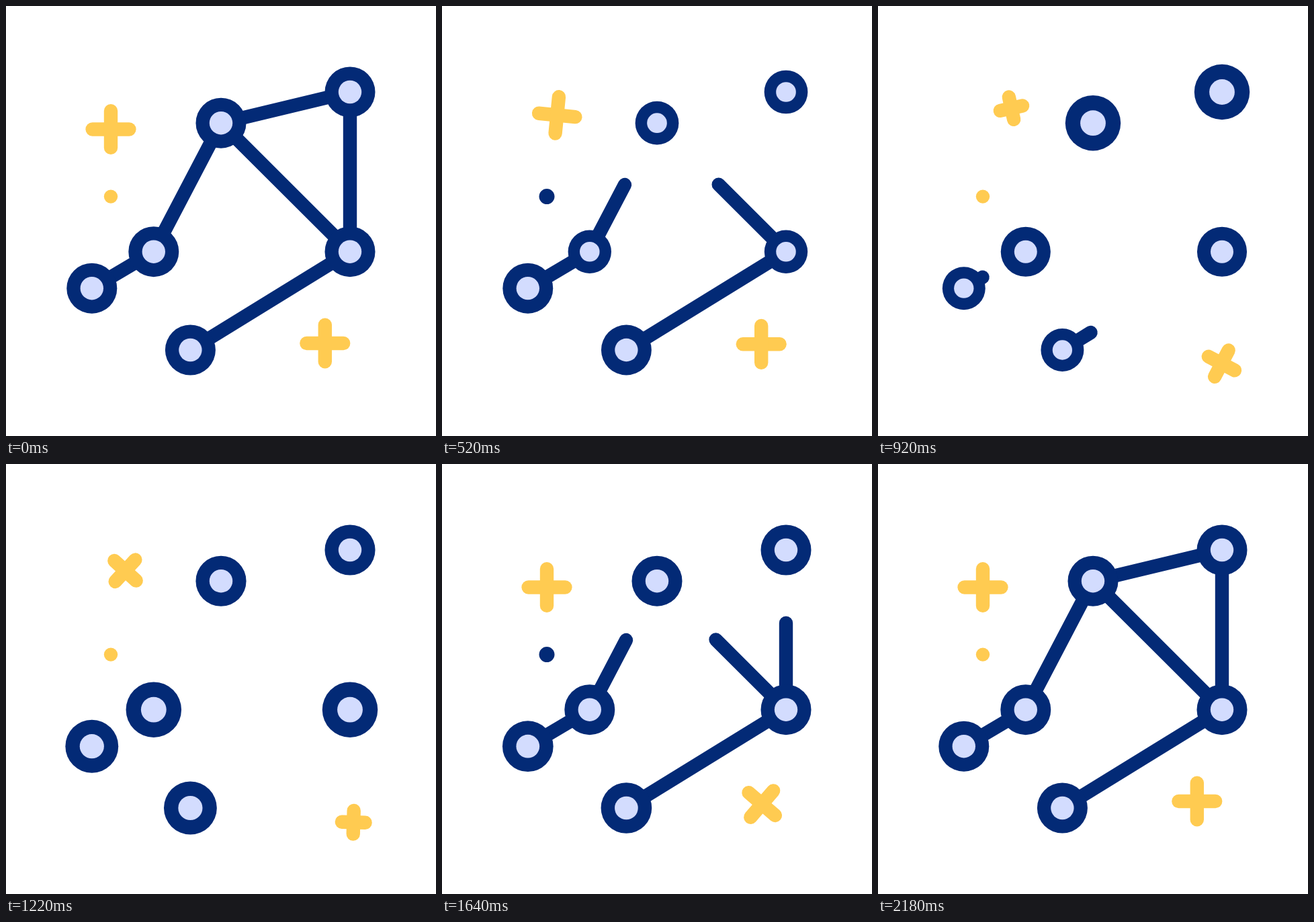
Recreate the animation shown at these times as an HTML page with a canvas. Size 640x640 px, loop 2400 ms.

```html
<!DOCTYPE html>
<html lang="en">
<head>
<meta charset="utf-8">
<title>Constellation</title>
<style>
  html, body { margin: 0; width: 100%; height: 100%; overflow: hidden; background: #fff; }
  canvas { display: block; width: 100vmin; height: 100vmin; }
</style>
</head>
<body>
<canvas id="stage"></canvas>
<script>
const LOOP = 2400, SIZE = 640;
const NAVY = '#032a76', PALE = '#d3dcfe', GOLD = '#ffcb51';
const canvas = document.getElementById('stage');
const ctx = canvas.getContext('2d');
const dpr = window.devicePixelRatio || 1;
canvas.width = canvas.height = SIZE * dpr;

// x, y, pulse delay
const nodes = {
  a: [512, 128, 0],
  b: [320, 174.2, 0],
  c: [219.8, 365.7, 230],
  f: [512, 365.7, 230],
  d: [127.8, 420.2, 460],
  e: [274.4, 512, 460]
};

// from, to, retract start, extend start
const links = [
  ['b', 'a', 0, 1770],
  ['f', 'a', 0, 1423],
  ['f', 'b', 315, 1423],
  ['c', 'b', 315, 1423],
  ['d', 'c', 624, 1173],
  ['e', 'f', 624, 1173]
];
const TRIM = 420;

const cubic = u => u < 0.5 ? 4 * u ** 3 : 1 - 4 * (1 - u) ** 3;
const sine = u => (1 - Math.cos(Math.PI * u)) / 2;
const span = (t, from, to, ease) =>
  ease(Math.min(1, Math.max(0, (t - from) / (to - from))));

function disc(x, y, r, color) {
  ctx.fillStyle = color;
  ctx.beginPath();
  ctx.arc(x, y, r, 0, Math.PI * 2);
  ctx.fill();
}

function line(x1, y1, x2, y2, color) {
  ctx.strokeStyle = color;
  ctx.beginPath();
  ctx.moveTo(x1, y1);
  ctx.lineTo(x2, y2);
  ctx.stroke();
}

function drawLink([from, to, retract, extend], t) {
  const part = 1 - span(t, retract, retract + TRIM, cubic)
    + span(t, extend, extend + TRIM, cubic);
  if (part < 0.001) return;
  const [x1, y1] = nodes[from], [x2, y2] = nodes[to];
  const len = Math.hypot(x2 - x1, y2 - y1);
  const ux = (x2 - x1) / len, uy = (y2 - y1) / len;
  const start = 27, tip = start + (len - 2 * start) * part;
  line(x1 + ux * start, y1 + uy * start, x1 + ux * tip, y1 + uy * tip, NAVY);
}

function drawNode([x, y, delay], t) {
  const p = t - delay;
  const scale = 1
    - 0.15 * span(p, 10, 380, cubic)
    + 0.25 * span(p, 380, 980, cubic)
    - 0.1 * span(p, 980, 1260, cubic);
  disc(x, y, 37.5 * scale, NAVY);
  disc(x, y, 17.2 * scale, PALE);
}

// Swings out along a curve while turning and shrinking, then comes back.
function drawPlus(x, y, dir, t) {
  const s = span(t, 140, 890, cubic) - span(t, 940, 1576, cubic);
  const bend = 2 * s * (1 - s);
  const turn = span(t, 458, 1015, sine) + span(t, 1060, 1558, sine);
  const arm = 27.4 - 10.4 * (span(t, 460, 900, cubic) - span(t, 900, 1560, sine));
  ctx.save();
  ctx.translate(x + 42.5 * (0.17 * bend + s * s), y + dir * 31.3 * (0.8 * bend + s * s));
  ctx.rotate(-dir * Math.PI * turn);
  line(-arm, 0, arm, 0, GOLD);
  line(0, -arm, 0, arm, GOLD);
  ctx.restore();
}

function drawDot(t) {
  const dark = t < 1760 && Math.floor(t / 440) % 2 === 1;
  disc(156, 283.6, dark ? 11.5 : 10.2, dark ? NAVY : GOLD);
}

function draw(t) {
  ctx.setTransform(dpr, 0, 0, dpr, 0, 0);
  ctx.fillStyle = '#fff';
  ctx.fillRect(0, 0, SIZE, SIZE);
  ctx.lineCap = 'round';
  ctx.lineWidth = 20.4;
  links.forEach(link => drawLink(link, t));
  Object.values(nodes).forEach(node => drawNode(node, t));
  drawPlus(156, 183.5, -1, t);
  drawPlus(474.8, 502, 1, t - 240);
  drawDot(t);
}

const begin = performance.now();
function tick() {
  draw((performance.now() - begin) % LOOP);
  requestAnimationFrame(tick);
}
tick();
</script>
</body>
</html>
```
